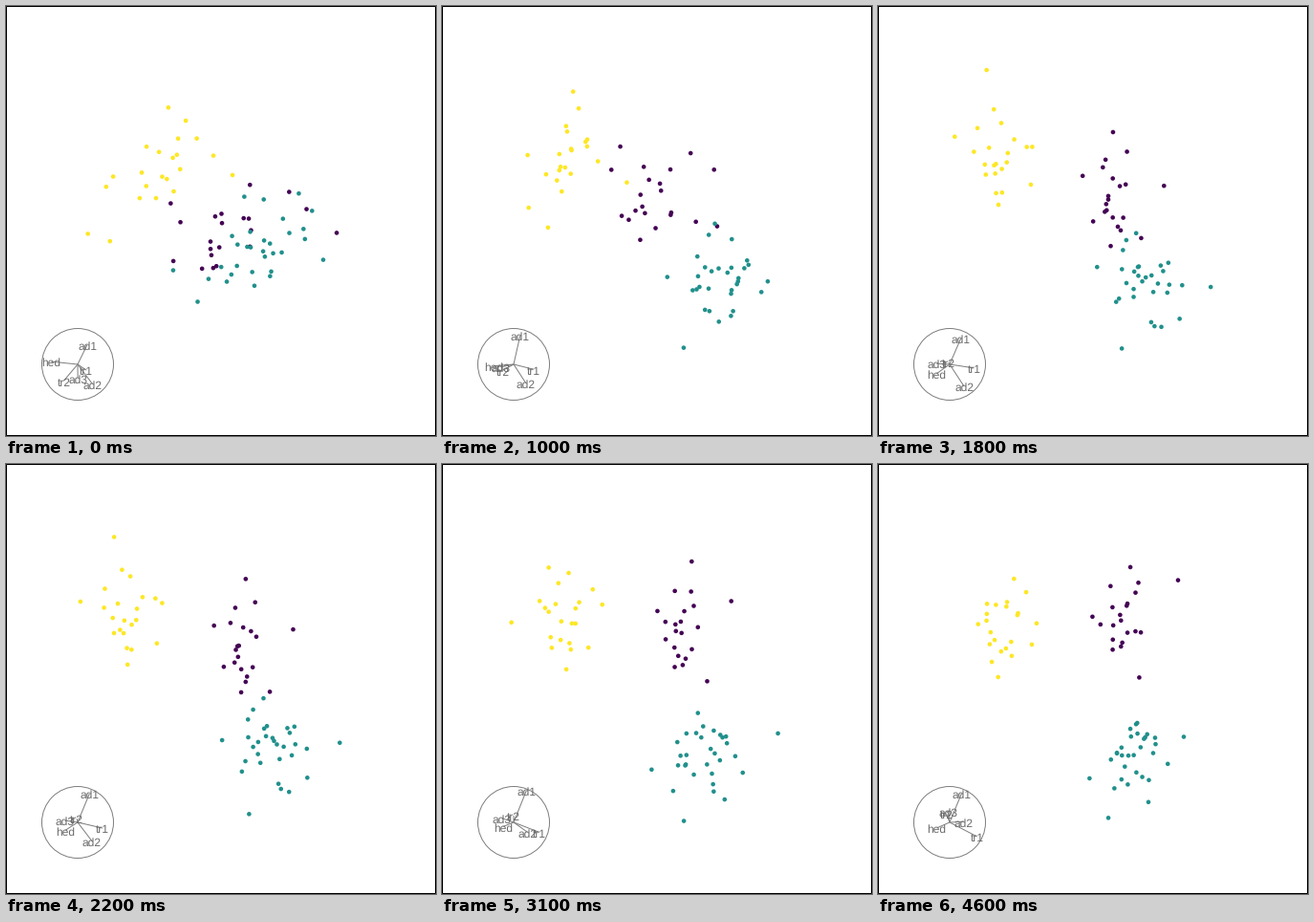
A matplotlib script that plays this animation: 450 px wide and 450 px high, repeating every 4.7 s.

```python
import matplotlib.pyplot as plt
import numpy as np
from matplotlib.animation import FuncAnimation
from matplotlib.collections import LineCollection
from matplotlib.patches import Circle, Rectangle

plt.rcParams["text.hinting"] = "none"

SIZE, DPI = 450, 100
FRAMES, INTERVAL = 47, 100
PX = 72 / DPI
HALF = SIZE / 2
HUB, RADIUS = np.array([75, 375]), 37.5
FLIP = np.array([1, -1])
LINE, TEXT = "#7f7f7f", "#6b6b6b"

LABELS = ["tr1", "tr2", "hed", "ad1", "ad2", "ad3"]

# Beetle species: colour, count, centre in the six variables
SPECIES = [
    ("#440154", 21, [.050, .148, .061, .284, .142, .143]),
    ("#fde725", 22, [-.333, .030, .084, .086, -.370, .169]),
    ("#21908c", 31, [.202, -.122, -.101, -.253, .167, -.216]),
]
SPREAD = np.array([.105, .195, .165, .12, .125, .105])

# Tour stops: step -> horizontal and vertical loadings
STOPS = {
    0: [[.245, -.39, -.74, .265, .42, .005], [-.165, -.46, .08, .545, -.555, -.385]],
    10: [[.56, -.30, -.565, .187, .34, -.37], [-.14, -.17, -.05, .83, -.53, -.08]],
    18: [[.68, -.03, -.375, .32, .40, -.37], [-.10, .06, -.27, .74, -.62, .02]],
    31: [[.72, 0, -.30, .355, .39, -.34], [-.28, .19, -.12, .89, -.28, .12]],
    39: [[.80, -.08, -.27, .37, .37, -.13], [-.38, .26, -.10, .87, -.06, .10]],
    46: [[.77, -.09, -.37, .345, .40, -.05], [-.40, .24, -.165, .83, .02, .31]],
}


def sample(rng, count, centre):
    """Random beetles around a centre; body size links the first three."""
    z = rng.normal(size=(count, 6))
    size = rng.normal(size=(count, 1))
    z[:, :3] = .87 * size + .5 * z[:, :3]
    z = (z - z.mean(axis=0)) / z.std(axis=0)
    return centre + SPREAD * z


def orthonormal(m):
    u, _, vt = np.linalg.svd(m, full_matrices=False)
    return u @ vt


def basis(step):
    """Projection plane (6 x 2) at a step of the tour."""
    k = min(np.searchsorted(steps, step, side="right") - 1, len(steps) - 2)
    t = (step - steps[k]) / (steps[k + 1] - steps[k])
    return orthonormal((1 - t) * bases[k] + t * bases[k + 1])


rng = np.random.default_rng(4)
data = np.vstack([sample(rng, n, c) for _, n, c in SPECIES])
colors = [color for color, n, _ in SPECIES for _ in range(n)]
steps = np.array(list(STOPS))
bases = [orthonormal(np.transpose(rows)) for rows in STOPS.values()]

fig = plt.figure(figsize=(SIZE / DPI, SIZE / DPI), dpi=DPI, facecolor="white")
ax = fig.add_axes([0, 0, 1, 1])
ax.set_xlim(0, SIZE)
ax.set_ylim(SIZE, 0)
ax.axis("off")

ax.add_patch(Rectangle((.5, .5), SIZE - 1, SIZE - 1, fill=False, ec="black",
                       lw=PX, snap=False))
ax.add_patch(Circle(HUB, RADIUS, fill=False, ec=LINE, lw=PX))
spokes = ax.add_collection(LineCollection([], colors=LINE, linewidths=PX))
dots = ax.scatter(*np.zeros((2, len(data))), c=colors, s=(4.6 * PX) ** 2,
                  linewidths=0, zorder=3)
names = [ax.text(0, 0, s, color=TEXT, ha="center", va="baseline", zorder=4,
                 fontname="Liberation Sans", fontsize=12 * PX)
         for s in LABELS]


def draw(step):
    plane = basis(step)
    dots.set_offsets(HALF + HALF * (data @ plane) * FLIP)
    tips = HUB + RADIUS * plane * FLIP
    spokes.set_segments([[HUB, tip] for tip in tips])
    for name, (x, y) in zip(names, tips):
        name.set_position((x, y + 5.2))
    return [dots, spokes, *names]


anim = FuncAnimation(fig, draw, frames=FRAMES, interval=INTERVAL,
                     init_func=lambda: draw(0), repeat=True, repeat_delay=0)
plt.show()
```
